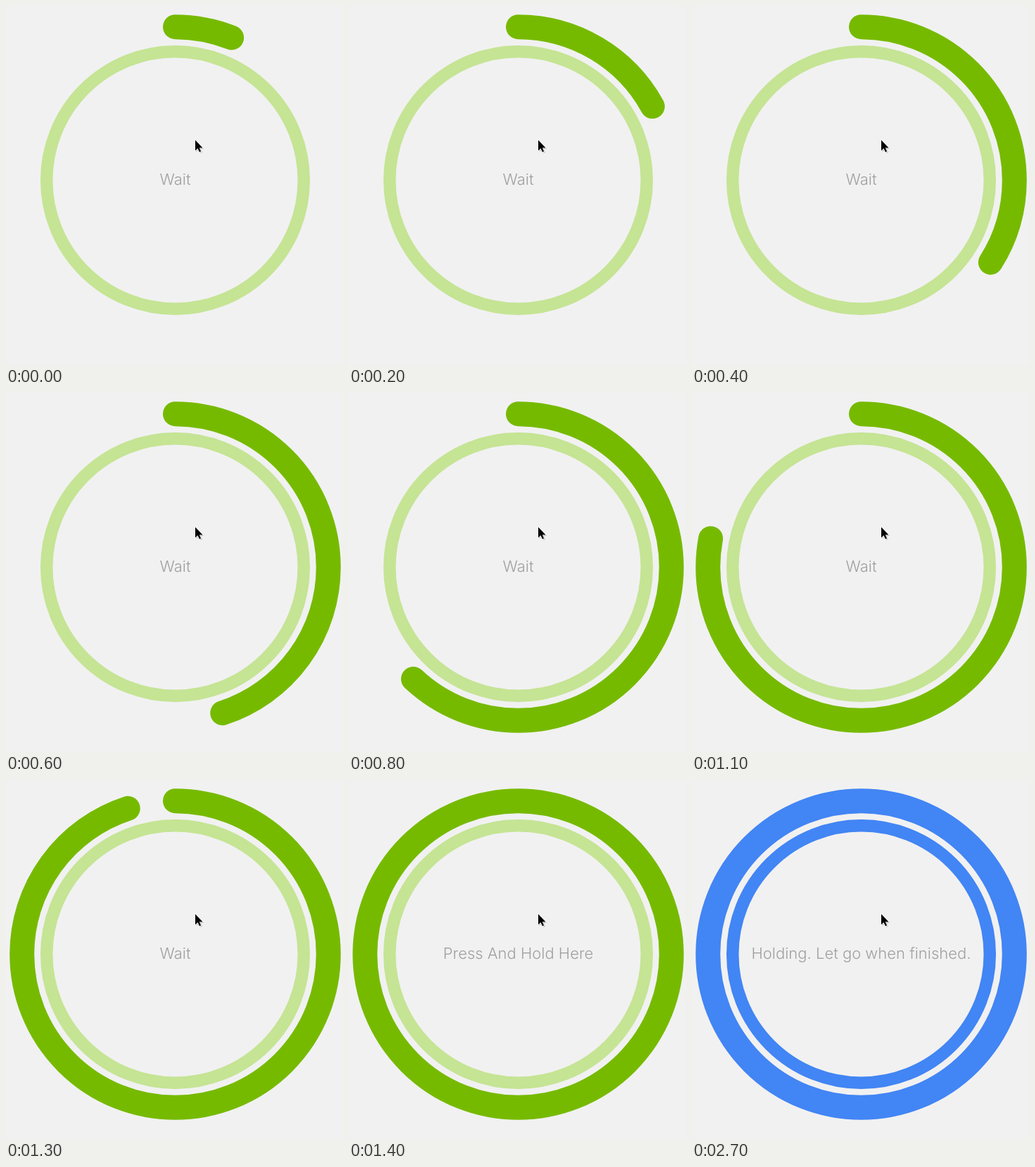
Recreate the animation shown at these times as an HTML page. Size 479 by 510 pixels, loop 4.3 s.

```html
<!DOCTYPE html>
<html lang="en">
<head>
<meta charset="utf-8">
<title>Press and hold</title>
<style>
  html, body { margin: 0; width: 100%; height: 100%; overflow: hidden; background: #f1f1f1; }
  svg { display: block; }
  circle { fill: none; }
  text { font: 300 22px Inter, sans-serif; fill: #a0a0a0; text-anchor: middle; }
</style>
</head>
<body>
<svg width="479" height="510">
  <circle id="ring" cx="240.5" cy="247.5" r="182.8" stroke-width="17.5"/>
  <circle id="bar" cx="240.5" cy="247.5" r="217.8" stroke-width="35" stroke-linecap="round"
          pathLength="100" transform="rotate(-90 240.5 247.5)"/>
  <text id="label" x="240.5" y="254"></text>
  <g transform="translate(268.5 190)">
    <path d="M2 3V17L5.5 14L8 19L10.5 18L8.5 13H13Z" fill="#999" opacity=".6"/>
    <path d="M.5.5V15.5L4 12.3L6.4 17.6L8.6 16.6L6.3 11.5H11Z" stroke="#f8f8f8" stroke-width="1.6" paint-order="stroke"/>
  </g>
</svg>
<script>
const LOOP = 4300, STEP = 100, READY = 1400, HELD = 2700;
const GREEN = '#76ba00', PALE = '#c5e494', BLUE = '#4285f4';
const [ring, bar, label] = ['ring', 'bar', 'label'].map(id => document.getElementById(id));

// Progress ticks every 100 ms, skipping one tick in every five.
function percent(t) {
  const n = Math.floor(t / STEP);
  const ticks = n + Math.floor((n + 2) / 5);
  return Math.min(100, Math.round(6 + 5.55 * ticks));
}

function draw(t) {
  const held = t >= HELD;
  const p = percent(t);
  ring.setAttribute('stroke', held ? BLUE : PALE);
  bar.setAttribute('stroke', held ? BLUE : GREEN);
  bar.setAttribute('stroke-dasharray', p < 100 ? `${p} 200` : 'none');
  label.textContent = held ? 'Holding. Let go when finished.'
    : t >= READY ? 'Press And Hold Here' : 'Wait';
}

function tick() {
  draw(performance.now() % LOOP);
  requestAnimationFrame(tick);
}
tick();
</script>
</body>
</html>
```
